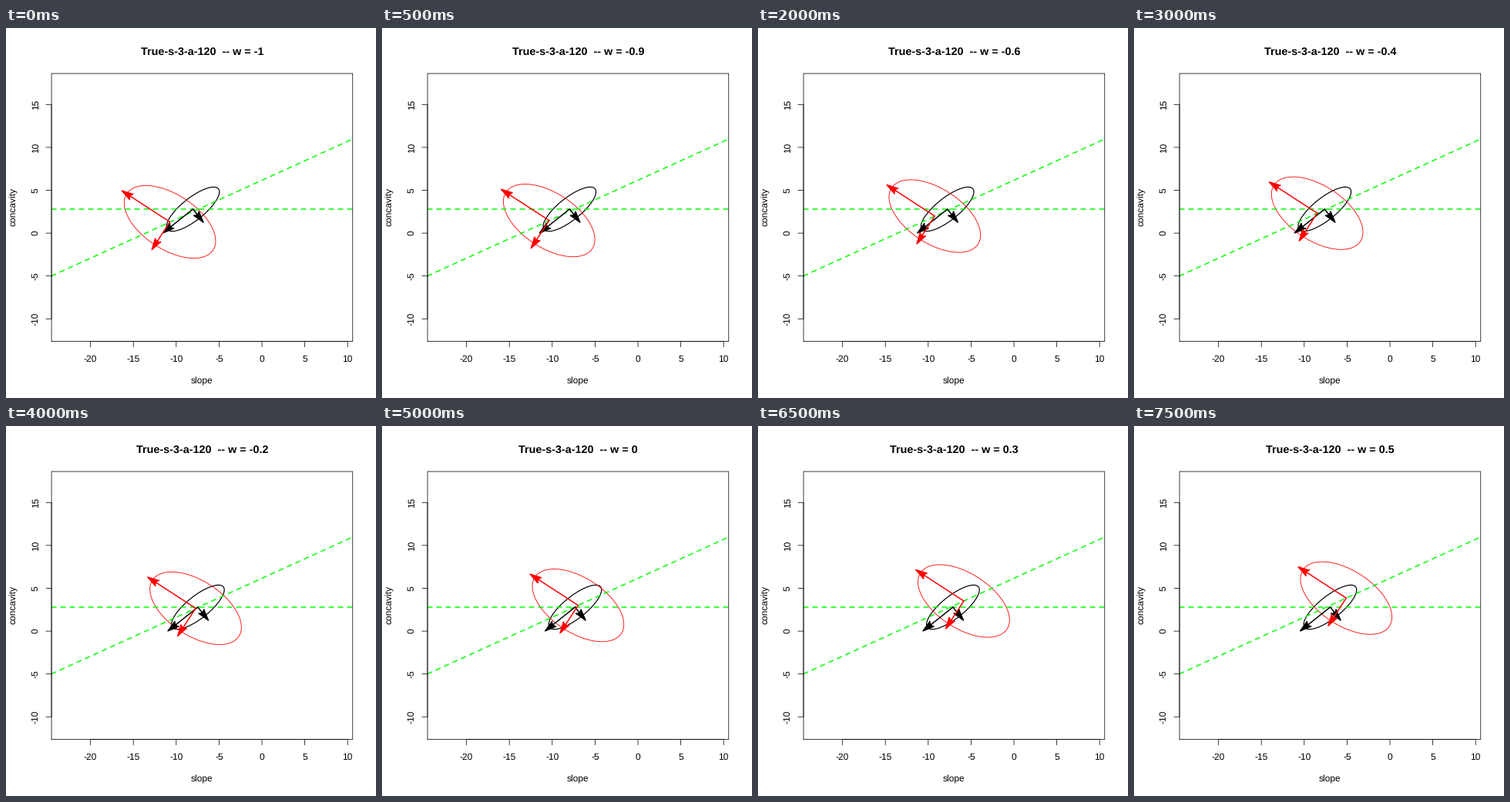
A matplotlib script that plays this animation: 480x480 px, repeating every 8000 ms.

```python
import numpy as np
import matplotlib
import matplotlib.pyplot as plt
from matplotlib.animation import FuncAnimation
from matplotlib.patches import Polygon, Rectangle

matplotlib.rcParams["font.family"] = "Liberation Sans"
matplotlib.rcParams["text.hinting"] = "none"

SIZE, DPI = 480, 72
FRAMES, INTERVAL = 16, 500
LEFT, RIGHT, TOP, BOTTOM = 59.04, 449.76, 59.04, 406.56
X0, Y0, UNIT = 332.0, 266.1, 11.12      # plot origin and scale in pixels
LIME = "#00ff00"
CM = DPI / 2.54

fig = plt.figure(figsize=(SIZE / DPI, SIZE / DPI), dpi=DPI, facecolor="white")
ax = fig.add_axes([0, 0, 1, 1])
ax.set_xlim(0, SIZE)
ax.set_ylim(SIZE, 0)
ax.axis("off")


def px(x):
    return X0 + UNIT * x


def py(y):
    return Y0 - UNIT * y


def thin(xs, ys):
    ax.plot(xs, ys, color="black", lw=0.75, snap=False,
            solid_capstyle="round", zorder=6)


def label(x, y, text, angle=0, **style):
    style = {"fontsize": 12, **style}
    return ax.text(x, y, text, rotation=angle, rotation_mode="anchor",
                   ha="center", va="baseline", **style)


def head_shape(length=14.6, half=4.1, notch=1.6, n=12):
    """Arrowhead along +x with a rounded notch, centred on its own length."""
    s = np.linspace(-np.pi / 2, np.pi / 2, n)
    xs = np.append(notch * np.cos(s), length) - length / 2
    return xs, np.append(half * np.sin(s), 0)


HEAD = head_shape()
TURN = np.linspace(0, 2 * np.pi, 201)


class Arrow:
    def __init__(self, vec, color, z):
        self.vec = vec
        self.shaft, = ax.plot([], [], color=color, lw=1.5, zorder=z,
                              solid_capstyle="round")
        self.head = Polygon([[0, 0], [1, 1]], closed=True, facecolor=color,
                            edgecolor=color, lw=1.5, joinstyle="round",
                            zorder=z)
        ax.add_patch(self.head)

    def place(self, c):
        tip = c + self.vec
        u = self.vec / np.hypot(*self.vec)
        normal = np.array([-u[1], u[0]])
        self.shaft.set_data([c[0], tip[0]], [c[1], tip[1]])
        self.head.set_xy(tip + np.outer(HEAD[0], u) + np.outer(HEAD[1], normal))


class Spread:
    """Ellipse with an arrow along each half axis; its centre drifts with w."""

    def __init__(self, center, drift, angle, major, minor, color, lw, z):
        self.center, self.drift = np.array(center), np.array(drift)
        a = np.radians(angle)
        u = np.array([np.cos(a), np.sin(a)])
        v = np.array([-u[1], u[0]])
        v *= np.sign(v[1])              # minor axis points down the screen
        self.ring = np.outer(np.cos(TURN), major * u) + np.outer(np.sin(TURN), minor * v)
        self.line, = ax.plot([], [], color=color, lw=lw, zorder=z)
        self.arrows = [Arrow(major * u, color, z + 3), Arrow(minor * v, color, z + 3)]

    def place(self, w):
        c = self.center + w * self.drift
        self.line.set_data(*(c + self.ring).T)
        for arrow in self.arrows:
            arrow.place(c)


# Box, then the axes drawn over it
thin([LEFT, RIGHT, RIGHT, LEFT, LEFT], [BOTTOM, BOTTOM, TOP, TOP, BOTTOM])
thin([px(-20), px(10)], [BOTTOM, BOTTOM])
thin([LEFT, LEFT], [py(-10), py(15)])
for v in range(-20, 11, 5):
    thin([px(v)] * 2, [BOTTOM, BOTTOM + 7.2])
    label(px(v), 432.5, str(v))
for v in range(-10, 16, 5):
    thin([LEFT - 7.2, LEFT], [py(v)] * 2)
    label(41.8, py(v), str(v), 90)
MID_X, MID_Y = (LEFT + RIGHT) / 2, (TOP + BOTTOM) / 2
label(MID_X, 461.3, "slope")
label(13, MID_Y - 1, "concavity", 90)
title = label(MID_X, 34.8, "", fontsize=14.4, fontweight="bold")

# Dashed guides
clip = Rectangle((LEFT, TOP), RIGHT - LEFT, BOTTOM - TOP, transform=ax.transData)
ends = np.array([LEFT, RIGHT])
for slope, base in ((0, 2.8), (5 / 11, 6.165)):
    guide, = ax.plot(ends, py(base + slope * (ends - X0) / UNIT), color=LIME,
                     lw=1.5, ls=(0, (4, 4)), dash_capstyle="round",
                     snap=False, zorder=3)
    guide.set_clip_path(clip)

spreads = [
    Spread((250.5, 235), (8, 0), 141.5, 42.3, 14.5, "black", 1.2, 1),
    Spread((254.4, 232.65), (41.8, -18.9), 213, 66.9, 35.6, "red", 0.85, 2),
]


def update(i):
    w = (i - 10) / 10
    title.set_text(f"True-s-3-a-120  -- w = {w:g}")
    for s in spreads:
        s.place(w)
    return []


anim = FuncAnimation(fig, update, frames=FRAMES, interval=INTERVAL,
                     repeat=True, repeat_delay=0, blit=False)
plt.show()
```
